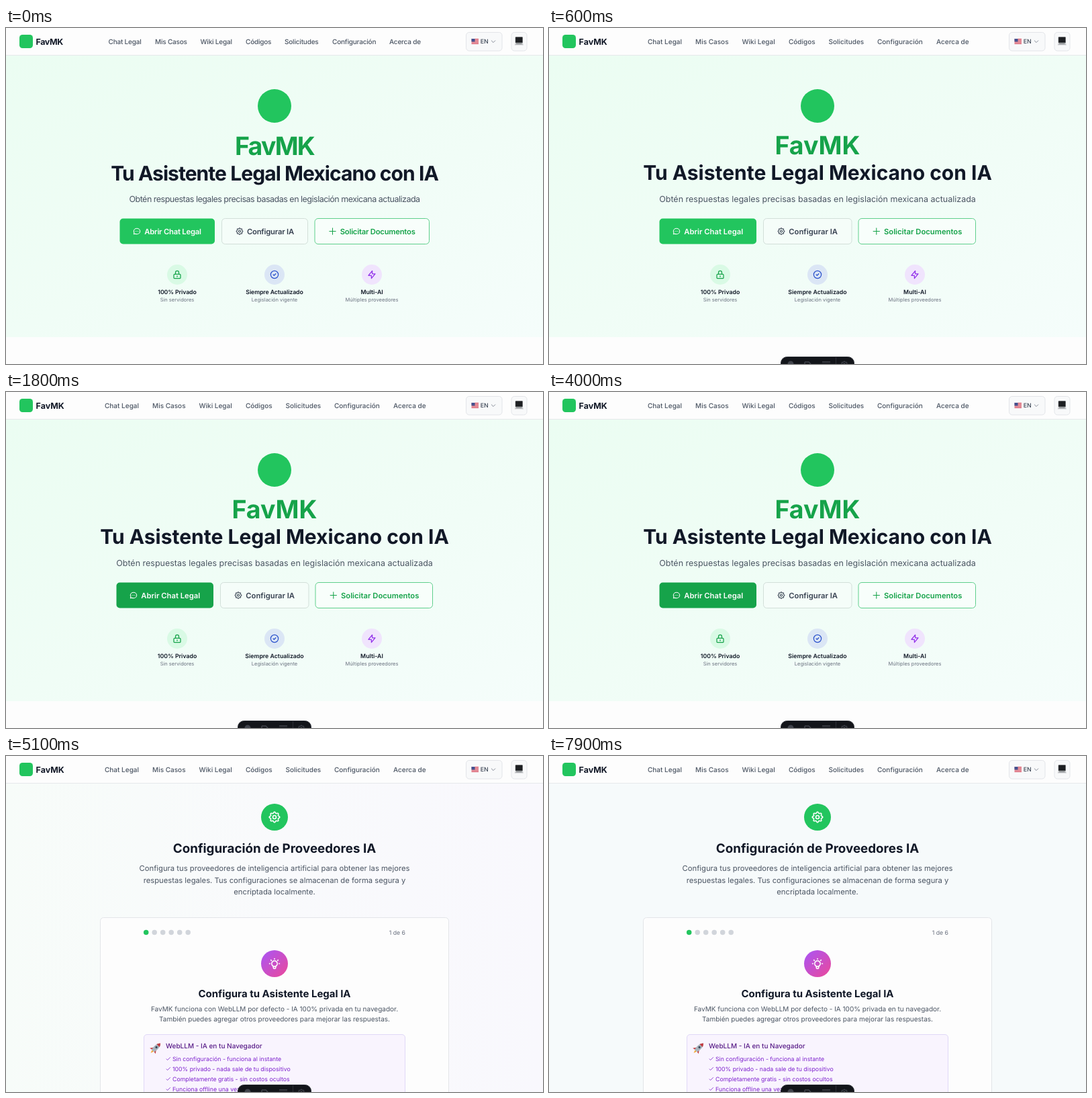
Animation, 800 px wide and 500 px high, one loop 8000 ms. Source, as an HTML page:

```html
<!DOCTYPE html>
<html lang="es">
<head>
<meta charset="utf-8">
<title>FavMK</title>
<style>
  html, body { margin: 0; width: 100%; height: 100%; overflow: hidden; background: #fdfdfd; }
  svg { display: block; width: 800px; height: 500px; }
  text { font-family: Inter, sans-serif; text-rendering: geometricPrecision; }
</style>
</head>
<body>
<svg id="stage" viewBox="0 0 800 500"></svg>
<script>
const LOOP = 8000, BRAND = 'FavMK';
const GREEN = '#22c55e', DEEP = '#16a34a', INK = '#111827', BODY = '#4b5563', MUTED = '#6b7280';

const text = (x, y, size, weight, fill, str, anchor = 'start', spacing = 0) =>
  `<text x="${x}" y="${y}" font-size="${size}" font-weight="${weight}" fill="${fill}"
    text-anchor="${anchor}" letter-spacing="${spacing}">${str}</text>`;
const mid = (y, size, weight, fill, str, spacing, x = 400) =>
  text(x, y, size, weight, fill, str, 'middle', spacing);
const rect = (x, y, w, h, fill, stroke = 'none', r = 0, more = '') =>
  `<rect x="${x}" y="${y}" width="${w}" height="${h}" rx="${r}" fill="${fill}" stroke="${stroke}" ${more}/>`;
const disc = (x, y, r, fill) => `<circle cx="${x}" cy="${y}" r="${r}" fill="${fill}"/>`;
const group = (id, body) => `<g id="${id}">${body}</g>`;

// Line icons live in a 24 by 24 box, centred on (x, y).
const icon = (name, x, y, size, color) =>
  `<path d="${icons[name]}" transform="translate(${x} ${y}) scale(${size / 24}) translate(-12 -12)"
    fill="none" stroke="${color}" stroke-width="2" stroke-linecap="round" stroke-linejoin="round"/>`;

function gearPath() {
  const pts = Array.from({ length: 96 }, (_, i) => {
    const a = i / 96 * 2 * Math.PI, r = 8.2 + 1.1 * Math.cos(8 * a);
    return (12 + r * Math.cos(a)).toFixed(2) + ' ' + (12 + r * Math.sin(a)).toFixed(2);
  });
  return `M${pts.join('L')}ZM15 12a3 3 0 11-6 0 3 3 0 016 0z`;
}

const icons = {
  gear: gearPath(),
  chat: 'M8 12h.01M12 12h.01M16 12h.01M21 12c0 4.418-4.03 8-9 8a9.863 9.863 0 01-4.255-.949L3 20l1.395-3.72C3.512 15.042 3 13.574 3 12c0-4.418 4.03-8 9-8s9 3.582 9 8z',
  plus: 'M12 3v18M3 12h18',
  lock: 'M12 15v2m-6 4h12a2 2 0 002-2v-6a2 2 0 00-2-2H6a2 2 0 00-2 2v6a2 2 0 002 2zm10-10V7a4 4 0 00-8 0v4h8z',
  done: 'M9 12l2 2 4-4m6 2a9 9 0 11-18 0 9 9 0 0118 0z',
  bolt: 'M13 10V3L4 14h7v7l9-11h-7z',
  bulb: 'M9.663 17h4.673M12 3v1m6.364 1.636l-.707.707M21 12h-1M4 12H3m3.343-5.657l-.707-.707m2.828 9.9a5 5 0 117.072 0l-.548.547A3.374 3.374 0 0014 18.469V19a2 2 0 11-4 0v-.531c0-.895-.356-1.754-.988-2.386l-.548-.547z',
  down: 'M19 9l-7 7-7-7',
  tick: 'M5 13l4 4L19 7'
};

const navItems = ['Chat Legal', 'Mis Casos', 'Wiki Legal', 'Códigos', 'Solicitudes', 'Configuración', 'Acerca de'];

// "early" is the page before the web font is ready: tighter text.
function header(early) {
  const starts = early ? [152.5, 222, 289.5, 357, 415, 486, 571] : [147, 218, 287.5, 357, 416.5, 489, 577];
  return text(44.5, 24.5, 12.5, 700, INK, BRAND, 'start', early ? -.4 : 0) +
    navItems.map((s, i) => text(starts[i], 23.6, 10, 500, BODY, s, 'start', early ? -.2 : 0)).join('');
}

function language(code, width, flag) {
  return rect(685.5, 6.5, width, 27.5, '#f8f9fa', '#e3e5e9', 4.5) + flag +
    text(706.7, 23.2, 8.75, 500, '#374151', code);
}

function usFlag() {
  let s = rect(693.5, 16, 10.5, 8, '#f4f0f1');
  for (let i = 0; i < 4; i++) s += rect(693.5, 16 + i * 2.2, 10.5, 1.3, '#d8485a');
  return s + rect(693.5, 16, 5, 4.4, '#43518f');
}

const mxFlag = rect(693.5, 16, 3.5, 8, '#23704f') + rect(697, 16, 3.5, 8, '#f2f2f2') +
  rect(700.5, 16, 3.5, 8, '#c8324a') + disc(698.75, 20, 1, '#9a7a55');

const bar = () => rect(0, 0, 800, 40, '#fdfdfd') + rect(0, 40, 800, 1, '#e6e8eb') +
  rect(20, 10, 20, 20, GREEN, 'none', 4.5) +
  rect(753, 6.5, 23, 27.5, '#f8f9fa', '#e3e5e9', 4.5) +
  rect(759, 13.5, 10.5, 8.5, '#1d1f22', '#55585c', .6, 'stroke-width=".6"') +
  '<path d="M758.7 22.4h11.1l1 3.2h-13.1z" fill="#c3c5c8"/><path d="M760 23.4h8.5" stroke="#66696d" stroke-width=".9"/>';

function hero(early) {
  const pick = (a, b) => early ? a : b;
  const drop = pick(1, 0);
  const button = (x0, x1, fill, stroke, name, ix, tx, color, label, id = '') =>
    rect(x0 + .5, 283.5, x1 - x0 - 1, 38, fill, stroke, 5, id) +
    icon(name, ix, 302.5, 12.5, color) +
    text(tx, 306.6, 11.25, 600, color, label, 'start', pick(-.22, 0));
  const feature = (x, fill, name, color, title, sub) =>
    disc(x, 367, 15, fill) + icon(name, x, 367, 15, color) +
    mid(396.3, 8.75, 600, INK, title, pick(-.1, 0), x) + mid(407.2, 7.5, 400, MUTED, sub, 0, x);

  return mid(188 + drop, 37.5, 700, DEEP, BRAND, pick(-1.8, 0)) +
    mid(225.6 + drop, 30, 700, INK, 'Tu Asistente Legal Mexicano con IA', pick(-.94, 0)) +
    mid(258.8, 12.5, 400, BODY, 'Obtén respuestas legales precisas basadas en legislación mexicana actualizada', pick(-.5, 0)) +
    button(pick(169, 164), pick(311.5, 309.5), GREEN, 'none', 'chat', pick(195, 190), pick(206.3, 201.3), '#fdfdfd',
      'Abrir Chat Legal', pick('', 'id="cta"')) +
    button(pick(321, 319), pick(450, 451.5), '#f5fdf9', '#d2dfd9', 'gear', pick(348, 346), pick(359, 357.3), '#374151', 'Configurar IA') +
    button(pick(459.5, 460.5), pick(631, 636), '#f8fefb', '#5fcf8c', 'plus', pick(486.5, 487.8), pick(497.7, 499), DEEP, 'Solicitar Documentos') +
    feature(255, '#d9fae5', 'lock', DEEP, '100% Privado', 'Sin servidores') +
    feature(400, '#dbe6f5', 'done', '#2b52cc', 'Siempre Actualizado', 'Legislación vigente') +
    feature(545, '#f0e4fd', 'bolt', '#9333ea', 'Multi-AI', 'Múltiples proveedores');
}

const rocket = `<g transform="translate(223 434.5) rotate(45)">
  <path d="M-3 2L-6 6.5L-2 5.5ZM3 2L6 6.5L2 5.5Z" fill="#c43a3f"/>
  <path d="M-1.6 6H1.6L0 10.5Z" fill="#f3a52c"/>
  <path d="M0-10C4-6 4 1 2.4 6H-2.4C-4 1-4-6 0-10Z" fill="#a9b4bd"/>
  <path d="M0-10C1.8-8 2.7-6.4 3-5H-3C-2.7-6.4-1.8-8 0-10Z" fill="#c43a3f"/>
  <circle cy="-1.5" r="1.6" fill="#36475a"/></g>`;

function setup() {
  const points = ['Sin configuración - funciona al instante', '100% privado - nada sale de tu dispositivo',
    'Completamente gratis - sin costos ocultos', 'Funciona offline una vez cargado'];
  let s = disc(400, 91, 20, GREEN) + icon('gear', 400, 91, 20, '#fdfdfd') +
    mid(143.8, 18.75, 700, INK, 'Configuración de Proveedores IA') +
    ['Configura tus proveedores de inteligencia artificial para obtener las mejores',
      'respuestas legales. Tus configuraciones se almacenan de forma segura y',
      'encriptada localmente.'].map((l, i) => mid(171 + i * 17.5, 11.25, 400, BODY, l)).join('') +
    rect(140.5, 240.5, 519, 300, '#fdfdfd', '#e3e5e9', 5);
  for (let i = 0; i < 6; i++) s += disc(208.7 + i * 12.5, 262.5, 3.75, i ? '#d1d5db' : GREEN);
  return s + text(595, 265.7, 8.75, 400, MUTED, '1 de 6', 'end') +
    disc(400, 309, 20, 'url(#pink)') + icon('bulb', 400, 309, 20, '#fdfdfd') +
    mid(359.3, 15, 700, INK, 'Configura tu Asistente Legal IA') +
    mid(380, 10, 400, BODY, BRAND + ' funciona con WebLLM por defecto - IA 100% privada en tu navegador.') +
    mid(395, 10, 400, BODY, 'También puedes agregar otros proveedores para mejorar las respuestas.') +
    rect(205.5, 414.5, 389, 120, '#f9f4fe', '#e0d8f7', 4.5) + rocket +
    text(238, 435.4, 10, 500, '#581c87', 'WebLLM - IA en tu Navegador') +
    points.map((p, i) => icon('tick', 241.8, 450.5 + i * 15, 9.5, '#7e22ce') +
      text(248, 453.7 + i * 15, 8.75, 400, '#7e22ce', p)).join('');
}

const toolbar = rect(345.5, 489.5, 109, 30, '#13151a', '#24272e', 9) +
  disc(360, 500, 4.5, '#41444c') +
  '<path d="M381 497h6l3 3M381 497v8M407 497h12M407 500.5h12" stroke="#41444c" stroke-width="1.4" fill="none"/>' +
  rect(427, 490, 1, 20, '#2b2e36') + icon('gear', 440, 501, 13, '#41444c');

const gradient = (id, diagonal, ...colors) =>
  `<linearGradient id="${id}" x2="1" y2="${diagonal}">` +
  colors.map((c, i) => `<stop offset="${i / (colors.length - 1)}" stop-color="${c}"/>`).join('') + '</linearGradient>';

document.getElementById('stage').innerHTML =
  '<defs>' + gradient('mint', 1, '#ebfdf2', '#f0fdf6', '#f5fdfb') + gradient('pink', 1, '#a855f7', '#ec4899') +
  gradient('wash1', 0, '#f7fcf9', '#f9fafc', '#f9f8fd') + gradient('wash2', 0, '#fafafa', '#f8fafb', '#f5fafc') + '</defs>' +
  group('home', rect(0, 41, 800, 419, 'url(#mint)') + disc(400, 116, 25, GREEN) +
    group('early', hero(true)) + group('ready', hero(false))) +
  group('config', rect(0, 41, 800, 459, 'url(#wash1)') +
    rect(0, 41, 800, 459, 'url(#wash2)', 'none', 0, 'id="cool"') +
    rect(0, 41, 800, 459, '#f6fafb', 'none', 0, 'id="even"') + setup()) +
  bar() + group('navEarly', header(true)) + group('navReady', header(false)) +
  group('en', language('EN', 53.5, usFlag()) + icon('down', 726, 20, 9.5, MUTED)) +
  group('es', language('ES', 40.5, mxFlag)) +
  group('tools', toolbar);

const $ = id => document.getElementById(id);
const show = (id, on) => $(id).setAttribute('display', on ? 'inline' : 'none');
const ramp = (t, a, b) => {
  const p = Math.min(1, Math.max(0, (t - a) / (b - a)));
  return p * p * (3 - 2 * p);
};

function draw(now) {
  const t = now % LOOP, early = t < 100, config = t >= 4200, spanish = config && t < 5100;
  show('home', !config);
  show('early', early);
  show('ready', !early);
  show('navEarly', early);
  show('navReady', !early);
  show('config', config);
  show('en', !spanish);
  show('es', spanish);
  const h = ramp(t, 1000, 1300), mix = (a, b) => Math.round(a + (b - a) * h);
  $('cta').setAttribute('fill', `rgb(${mix(34, 22)},${mix(197, 163)},${mix(94, 74)})`);
  $('cool').setAttribute('opacity', ramp(t, 5100, 5700));
  $('even').setAttribute('opacity', ramp(t, 6200, 7200));
  $('tools').setAttribute('transform', `translate(0 ${14 * (1 - ramp(t, 150, 500))})`);
  requestAnimationFrame(draw);
}
requestAnimationFrame(draw);
</script>
</body>
</html>
```
